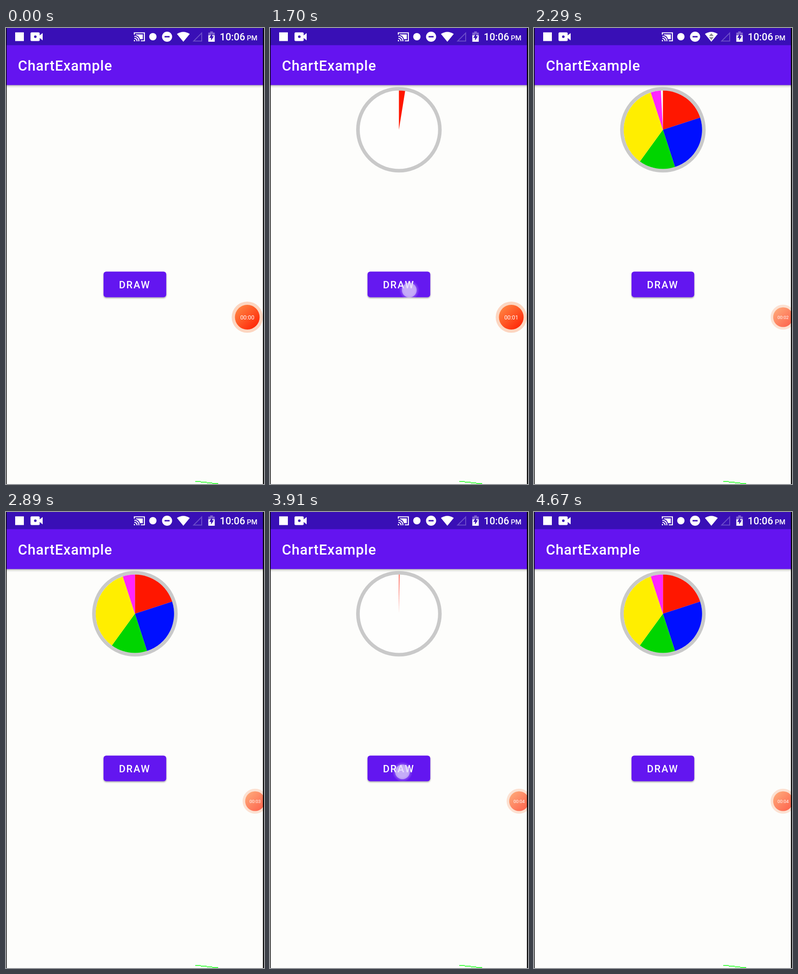
Recreate the animation shown at these times as an HTML page. Size 563x995 px, loop 4.75 s.

```html
<!DOCTYPE html>
<html lang="en">
<head>
<meta charset="utf-8">
<title>ChartExample</title>
<style>
  html, body { margin: 0; width: 100%; height: 100%; overflow: hidden; background: #fdfdfb; }
  svg { display: block; width: 100%; height: 100%; }
  text { font-family: Roboto, sans-serif; font-weight: 500; fill: #fff; }
</style>
</head>
<body>
<svg viewBox="0 0 563 995">
  <defs>
    <linearGradient id="shade" x2="0" y2="1">
      <stop stop-color="#000" stop-opacity=".35"/>
      <stop offset=".4" stop-color="#000" stop-opacity=".12"/>
      <stop offset="1" stop-color="#000" stop-opacity="0"/>
    </linearGradient>
    <linearGradient id="ember" x1=".1" y1=".1" x2=".85" y2=".9">
      <stop stop-color="#ff8442"/>
      <stop offset="1" stop-color="#ff2808"/>
    </linearGradient>
    <radialGradient id="glow">
      <stop offset=".5" stop-color="#fff" stop-opacity=".4"/>
      <stop offset="1" stop-color="#fff" stop-opacity="0"/>
    </radialGradient>
    <filter id="lift" x="-10%" y="-10%" width="120%" height="130%">
      <feDropShadow dx="0" dy="2" stdDeviation="1.5" flood-opacity=".35"/>
    </filter>
  </defs>

  <rect width="563" height="995" fill="#fdfdfb"/>
  <rect y="124" width="563" height="7" fill="url(#shade)"/>
  <rect y="37" width="563" height="87.500" fill="#6414f0"/>
  <rect width="563" height="37.500" fill="#390fb6"/>
  <text x="26" y="93" font-size="31.100" letter-spacing=".85">ChartExample</text>

  <!-- status bar -->
  <g fill="#fff">
    <rect x="20" y="9.500" width="19" height="19"/>
    <rect x="53.500" y="9.500" width="20" height="19" rx="2.500"/>
    <path d="M73 16.500L80 11V27L73 21.500Z"/>
    <circle cx="64" cy="19" r="2.800" fill="#390fb6"/>
    <g fill="none" stroke="#fff" stroke-width="2.200">
      <path d="M280 14.500V10.500H302V28H294M280 18A10 10 0 0 1 290 29M280 22.500A6 6 0 0 1 286 29"/>
    </g>
    <path d="M283.500 14H298.500V24.500H292.500Q290 16.500 283.500 15.500ZM279 26A3 3 0 0 1 282 29H279Z"/>
    <circle cx="320.500" cy="19" r="8"/>
    <circle cx="351.500" cy="19" r="11"/>
    <rect x="346" y="17.500" width="11" height="3" fill="#390fb6"/>
    <path d="M373 13Q387 4 401 13L387 30Z"/>
    <path id="traffic" d="M382 17.500L387 11.500L392 17.500ZM382 20L387 26L392 20Z" fill="#8c8a90"/>
    <path d="M409.500 28.500H427V11Z" fill="none" stroke="#6b4cc9" stroke-width="2"/>
    <path d="M441.500 16V10H445.500V7.500H451.500V10H455.500V16Z" fill-opacity=".35"/>
    <path d="M441.500 16H455.500V30H441.500Z"/>
    <path d="M450 11.500L443.500 21.500H447.500V27.500L453.500 18H450Z" fill="#390fb6"/>
  </g>
  <text x="466.500" y="27" font-size="21.800">10:06</text>
  <text x="525.500" y="27" font-size="15.200">PM</text>

  <g id="pie" transform="translate(281.300 222)">
    <circle r="89.400" fill="#fefefd" stroke="#c9c9c9" stroke-width="7.800"/>
  </g>

  <rect x="212.800" y="531.600" width="136.900" height="56" rx="6" fill="#6414f0" filter="url(#lift)"/>
  <rect id="ripple" x="212.800" y="531.600" width="136.900" height="56" rx="6" fill="#fff"/>
  <text x="246.400" y="568" font-size="21.800" letter-spacing="1.950">DRAW</text>

  <g id="touch">
    <circle r="22" fill="url(#glow)"/>
    <circle r="16" fill="#dccff8" fill-opacity=".62"/>
  </g>

  <g id="badge">
    <circle r="34" fill="#fcd6c1"/>
    <circle r="27" fill="url(#ember)"/>
    <text id="clock" y="4.500" font-size="12.300" text-anchor="middle" style="font-weight:400"></text>
  </g>

  <path d="M413 989.500H425M425 991H438M438 992.500H450M450 994H463" stroke="#0f0" stroke-width="1.500"/>
  <path d="M0 0H1.400V995H0ZM560.700 0H563V995H560.700Z"/>
</svg>
<script>
const LOOP = 4750, FRAME = LOOP / 56, SWEEP_MS = 760, RADIUS = 85.5;
const $ = id => document.getElementById(id);
const clamp = x => Math.min(1, Math.max(0, x));
const show = (id, on) => $(id).setAttribute('visibility', on ? 'visible' : 'hidden');

// Each tap restarts the chart at its release time.
const taps = [{ release: 1621, x: 304, y: 572 }, { release: 3877, x: 289, y: 567 }];

let turned = 0;
const slices = [[20, '#ff1700'], [25, '#000fff'], [15, '#00d500'], [35, '#ffee00'], [5, '#ff25ff']]
  .map(([percent, fill]) => {
    const path = document.createElementNS($('pie').namespaceURI, 'path');
    path.setAttribute('fill', fill);
    $('pie').append(path);
    const from = turned;
    turned += percent * 3.6;
    return { from, to: turned, path };
  });

// cubic-bezier(.4, 0, .2, 1), solved by bisection
function fastOutSlowIn(x) {
  let low = 0, high = 1, s;
  for (let i = 0; i < 20; i++) {
    s = (low + high) / 2;
    const guess = 1.2 * s * (1 - s) ** 2 + .6 * s * s * (1 - s) + s ** 3;
    if (guess < x) low = s; else high = s;
  }
  return s * s * (3 - 2 * s);
}

const rim = deg => {
  const a = deg * Math.PI / 180;
  return `${RADIUS * Math.sin(a)} ${-RADIUS * Math.cos(a)}`;
};
const wedge = (from, to) =>
  to > from ? `M0 0L${rim(from)}A${RADIUS} ${RADIUS} 0 0 1 ${rim(to)}Z` : '';

function drawChart(t) {
  const tap = taps.findLast(({ release }) => release <= t);
  const age = tap ? t - tap.release : 0;
  const sweep = 360 * fastOutSlowIn(clamp(age / SWEEP_MS));
  show('pie', tap);
  for (const { from, to, path } of slices)
    path.setAttribute('d', wedge(from, Math.min(to, sweep)));
  $('ripple').setAttribute('opacity', .29 * Math.sin(Math.PI * clamp((age - 45) / 500)) ** 2);
}

function drawTouch(t) {
  const tap = taps.find(({ release }) => t > release - 150 && t < release + 100);
  show('touch', tap);
  if (tap) $('touch').setAttribute('transform', `translate(${tap.x} ${tap.y})`);
}

function drawBadge(t) {
  const tuck = clamp((t - 1823) / 230);
  $('badge').setAttribute('transform', `translate(${526.5 + 17 * tuck} 631) scale(${1 - .2 * tuck})`);
  $('badge').setAttribute('opacity', 1 - .3 * tuck);
  $('clock').textContent = '00:0' + Math.floor((t + 155) / 1000);
}

function render(t) {
  drawChart(t);
  drawTouch(t);
  drawBadge(t);
  show('traffic', t > 2270 && t < 2770);
}

const start = performance.now();
function tick() {
  const t = (performance.now() - start) % LOOP;
  render(Math.floor((t + 3) / FRAME) % 56 * FRAME);
  requestAnimationFrame(tick);
}
tick();
</script>
</body>
</html>
```
